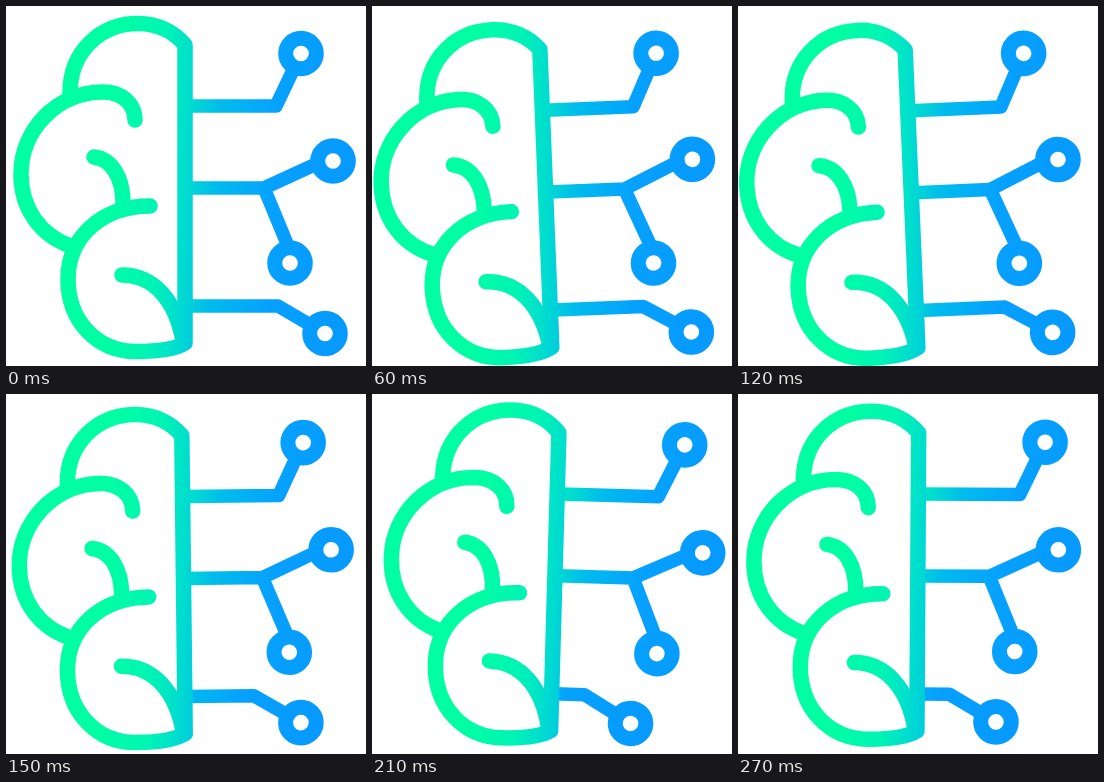
These frames come from a looping animation (360 px wide and 360 px high, 0.3 s). An HTML page:

```html
<!DOCTYPE html>
<html lang="en">
<head>
<meta charset="utf-8">
<title>Brain circuit</title>
<style>
  html, body { margin: 0; width: 100%; height: 100%; overflow: hidden; background: #fff; }
  svg { display: block; width: 100vw; height: 100vh; }
  .brain, .wire, circle { stroke: url(#tint); stroke-linecap: round; stroke-linejoin: round; }
  .brain { fill: none; stroke-width: 15.5; }
  .wire { fill: none; stroke-width: 13.5; }
  circle { fill: #fff; stroke-width: 15; }
</style>
</head>
<body>
<svg viewBox="0 0 360 360">
  <defs>
    <linearGradient id="tint" gradientUnits="userSpaceOnUse" x1="0" y1="170" x2="360" y2="190">
      <stop offset=".28" stop-color="#00ffa2"/>
      <stop offset=".42" stop-color="#00f4b4"/>
      <stop offset=".5" stop-color="#00dcd0"/>
      <stop offset=".58" stop-color="#00bcec"/>
      <stop offset=".75" stop-color="#06a0ff"/>
      <stop offset="1" stop-color="#0698ff"/>
    </linearGradient>
  </defs>
  <g id="art">
    <g id="top">
      <path class="wire"/>
      <circle cx="295" cy="47.5" r="15.3"/>
    </g>
    <g id="mid">
      <path class="wire"/>
      <circle cx="327" cy="155" r="15.3"/>
      <circle cx="284" cy="257" r="15.3"/>
    </g>
    <g id="low">
      <path class="wire"/>
      <circle cx="319" cy="327.5" r="15.3"/>
    </g>
    <g class="brain">
      <path d="M64 87C64 45 95 17.500 132 17.500C153 17.500 169 27 179 39V337C168 344 150 345.500 130 345.500C92 345.500 62 316 62 273C62 232 95 200 144 200"/>
      <path d="M129 114C129 97 115 86 97 86C50 86 15 125 15 168C15 203 35 230 65 240"/>
      <path d="M88 151C106 153 117 172 117 197"/>
      <path d="M116 269C148 269 170 295 177 335"/>
    </g>
  </g>
</svg>
<script>
const STEP = 30, STEPS = 10;

// smooth progress from 0 to 1 while k runs from a to b
function ease(k, a, b) {
  const p = Math.min(1, Math.max(0, (k - a) / (b - a)));
  return p * p * p * (p * (6 * p - 15) + 10);
}

// rest, lean to one extreme, swing to the other, return to rest
const swing = (k, left, right) =>
  left * ease(k, 0, 3) + (right - left) * ease(k, 3, 7) - right * ease(k, 7, STEPS);

// each wire keeps its root while its bend and nodes slide sideways
const wires = [
  { id: 'top', slide: k => 10.5 * ease(k, 2, 8), path: root => `M${root} 100H270L295 47.5` },
  { id: 'mid', slide: k => -8.5 * ease(k, 6, 10), path: root => `M${root} 182H258L308 159M258 182L282 240` },
  { id: 'low', slide: k => -61 * ease(k, 3, 7.5), path: root => `M${root} 300H272L319 327.5` }
];

const art = document.getElementById('art');
for (const wire of wires) {
  wire.group = document.getElementById(wire.id);
  wire.line = wire.group.querySelector('.wire');
}

function draw(time) {
  const k = Math.floor(time / STEP) % STEPS;
  const tilt = swing(k, -2.9, 1.6), drop = swing(k, -0.9, 3.1);
  art.setAttribute('transform', `translate(0 ${drop}) rotate(${tilt} 300 320)`);
  for (const { group, line, slide, path } of wires) {
    const x = slide(k);
    group.setAttribute('transform', `translate(${x} 0)`);
    line.setAttribute('d', path(182 - x));
  }
}

const start = performance.now();
function tick() {
  draw(performance.now() - start);
  requestAnimationFrame(tick);
}
tick();
</script>
</body>
</html>
```
